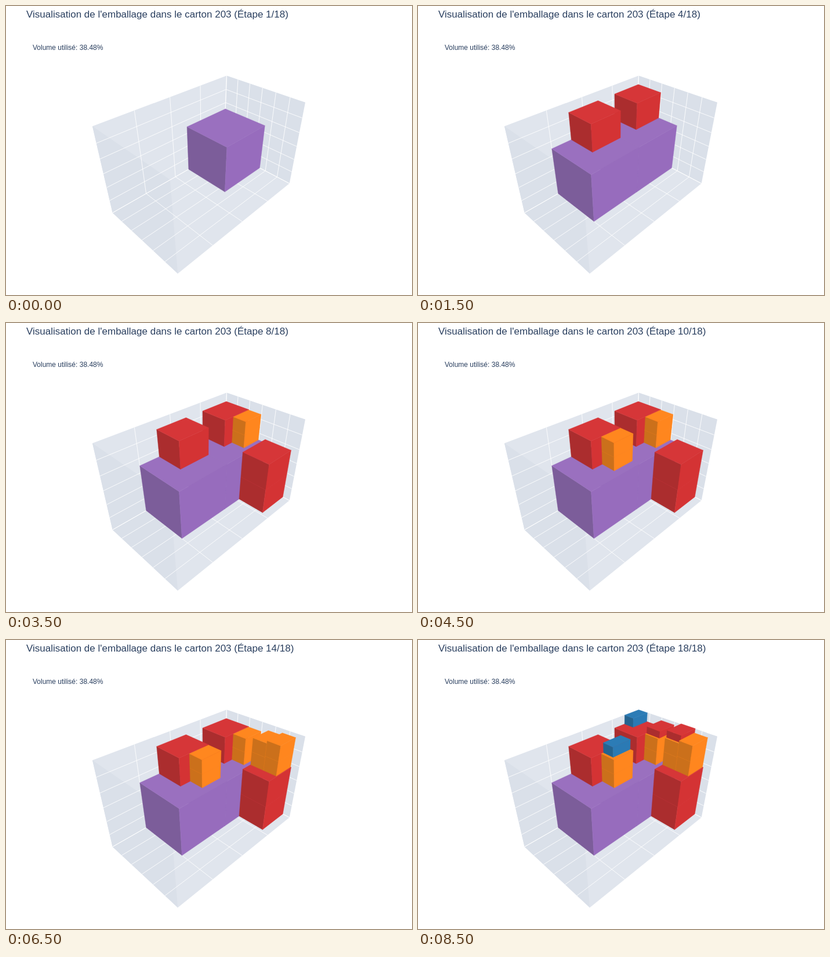
An HTML page that plays this animation: 700x500 px, repeating every 9 s.

```html
<!DOCTYPE html>
<html lang="fr">
<head>
<meta charset="utf-8">
<title>Emballage du carton</title>
<style>
  html, body { margin: 0; width: 100%; height: 100%; overflow: hidden; background: #fff; }
  svg { display: block; }
  text { font-family: "Liberation Sans", Arial, sans-serif; fill: #2a3f5f; white-space: pre; }
</style>
</head>
<body>
<svg width="700" height="500" viewBox="0 0 700 500">
  <g id="room"></g>
  <g id="boxes"></g>
  <text id="title" x="35" y="20" font-size="17"></text>
  <text x="46" y="76" font-size="12">Volume utilisé: 38.48%</text>
</svg>
<script>
const STEP_MS = 500;
const LENGTH = 20, WIDTH = 12, HEIGHT = 12;

// Homogeneous camera columns: top back corner, then the full length, width and depth of the carton.
const CORNER = [380.5, 120.5, 1];
const ALONG = [-271.28, 32.04, -0.26701];
const ACROSS = [52.86, 19.54, -0.16017];
const DOWN = [54.52, 166.43, 0.1585];

function project([u, v, h]) {
  const [x, y, w] = CORNER.map((c, i) =>
    c + ALONG[i] * u / LENGTH + ACROSS[i] * v / WIDTH + DOWN[i] * (1 - h / HEIGHT));
  return [x / w, y / w].map(n => n.toFixed(2)).join(",");
}

function addShape(parent, tag, points, attributes) {
  const shape = document.createElementNS("http://www.w3.org/2000/svg", tag);
  shape.setAttribute("points", points.map(project).join(" "));
  for (const key in attributes) shape.setAttribute(key, attributes[key]);
  parent.append(shape);
  return shape;
}

// The four corners of a face: axis is held at one value, the others span low..high.
function face(axis, at, low, high) {
  const [a, b] = [0, 1, 2].filter(i => i !== axis);
  return [[0, 0], [1, 0], [1, 1], [0, 1]].map(([p, q]) => {
    const point = [];
    point[axis] = at;
    point[a] = p ? high[a] : low[a];
    point[b] = q ? high[b] : low[b];
    return point;
  });
}

function drawRoom() {
  const room = document.getElementById("room");
  const low = [0, 0, 0], high = [LENGTH, WIDTH, HEIGHT], spacing = [5, 2, 2];
  const plane = (axis, at, fill) => addShape(room, "polygon", face(axis, at, low, high), { fill });
  plane(1, 0, "#e0e5ed");
  plane(2, 0, "#e0e5ed");
  plane(0, 0, "#dae0e9");
  plane(0, LENGTH, "#dae0e9");

  for (let normal = 0; normal < 3; normal++) {
    for (let axis = 0; axis < 3; axis++) {
      if (axis === normal) continue;
      const run = 3 - axis - normal;
      for (let at = 0; at < high[axis]; at += spacing[axis]) {
        const from = [0, 0, 0], to = [0, 0, 0];
        from[axis] = to[axis] = at;
        to[run] = high[run];
        addShape(room, "polyline", [from, to],
          { stroke: "#fff", "stroke-width": 1, "stroke-opacity": 0.85 });
      }
    }
  }
}

// Face colours are ordered: end, side, top.
const PURPLE = ["#7c5d9a", "#976cbd", "#9a70bf"];
const RED = ["#ab2d2e", "#d43334", "#d63638"];
const ORANGE = ["#cb701b", "#ff861e", "#ff871f"];
const BLUE = ["#25638f", "#2b7ab4", "#2c7cb6"];

const KINDS = {
  crate: { size: [7.5, 7, 7], colors: PURPLE },
  cube: { size: [4.6, 3.93, 3.73], colors: RED },
  brick: { size: [3.06, 2, 1.84], colors: ORANGE },
  turnedBrick: { size: [3.06, 1.84, 2], colors: ORANGE },
  slab: { size: [2.8, 2.04, 0.9], colors: RED },
  chip: { size: [2.73, 1.53, 1.24], colors: BLUE }
};

// In packing order: kind, then the corner nearest the back of the carton.
const PACKING = [
  ["crate", 0, 0, 0],
  ["crate", 7.5, 0, 0],
  ["cube", 0, 0, 7],
  ["cube", 7.5, 0, 7],
  ["cube", 0, 7, 0],
  ["cube", 0, 7, 3.73],
  ["brick", 0, 3.93, 7],
  ["brick", 0, 3.93, 8.84],
  ["brick", 7.5, 3.93, 7],
  ["brick", 7.5, 3.93, 8.84],
  ["brick", 0, 7, 7.46],
  ["brick", 0, 7, 9.3],
  ["turnedBrick", 0, 9, 7.46],
  ["turnedBrick", 0, 9, 9.46],
  ["slab", 0, 7, 11.14],
  ["slab", 0, 3.93, 10.68],
  ["chip", 7.5, 3.93, 10.68],
  ["chip", 0, 0, 10.73]
];

function drawBoxes() {
  const parent = document.getElementById("boxes");
  // Far to near: by width, then height, then length.
  return PACKING
    .map(([kind, ...low], step) => ({ ...KINDS[kind], low, step }))
    .sort((a, b) => a.low[1] - b.low[1] || a.low[2] - b.low[2] || a.low[0] - b.low[0])
    .map(({ size, colors, low, step }) => {
      const group = document.createElementNS("http://www.w3.org/2000/svg", "g");
      const high = low.map((n, i) => n + size[i]);
      colors.forEach((fill, axis) => addShape(group, "polygon", face(axis, high[axis], low, high),
        { fill, stroke: fill, "stroke-width": 0.5, "stroke-linejoin": "round" }));
      parent.append(group);
      return { group, step };
    });
}

drawRoom();
const boxes = drawBoxes();
const title = document.getElementById("title");
const start = performance.now();
let shown = -1;

function render() {
  const elapsed = Math.max(0, performance.now() - start);
  const step = Math.floor(elapsed / STEP_MS) % PACKING.length;
  if (step !== shown) {
    shown = step;
    title.textContent =
      `Visualisation de l'emballage dans le carton 203 (Étape ${step + 1}/${PACKING.length})`;
    for (const box of boxes) box.group.style.display = box.step <= step ? "" : "none";
  }
  requestAnimationFrame(render);
}
render();
</script>
</body>
</html>
```
